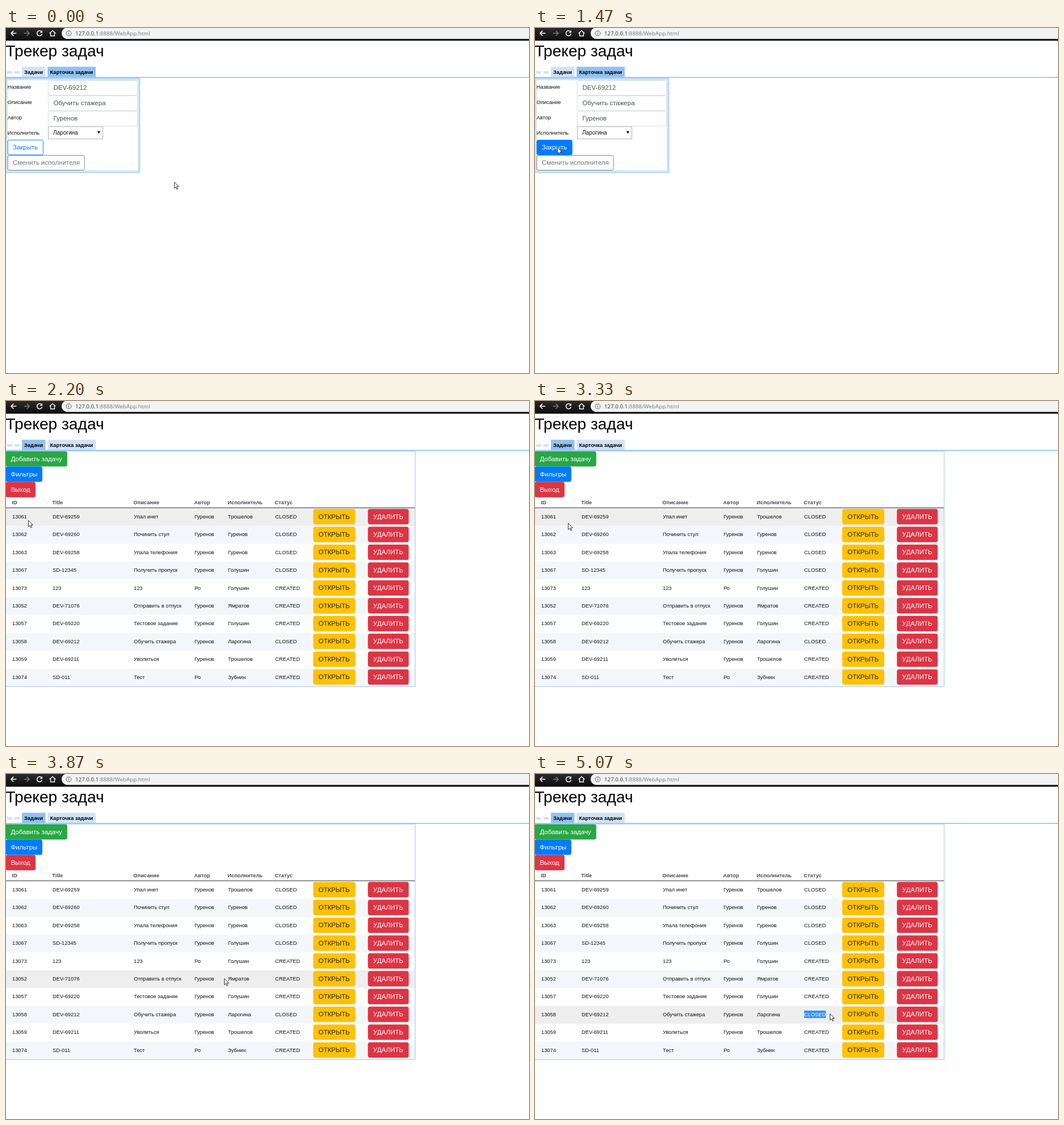
Animation of 921x608 px, one loop 5140 ms. Source, as an HTML page:

```html
<!DOCTYPE html>
<html lang="ru">
<head>
<meta charset="utf-8">
<title>Трекер задач</title>
<style>
  html, body { margin: 0; width: 100%; height: 100%; overflow: hidden; background: #fff; }
  svg { display: block; width: 921px; height: 608px; font-family: "Liberation Sans", Arial, sans-serif; }
  text { white-space: pre; }
</style>
</head>
<body>
<svg id="stage" viewBox="0 0 921 608" xmlns="http://www.w3.org/2000/svg"></svg>
<script>
const NS = 'http://www.w3.org/2000/svg';
const stage = document.getElementById('stage');
const SMALL = 9.3, NORMAL = 11.5;
const LIGHT = '#d0e4f6', ACCENT = '#92c1f0', BLUE = '#007bff', RED = '#dc3545';

function add(parent, tag, attrs = {}, content) {
  const el = document.createElementNS(NS, tag);
  for (const key in attrs) el.setAttribute(key, attrs[key]);
  if (content !== undefined) el.textContent = content;
  parent.appendChild(el);
  return el;
}
const rect = (g, x, y, width, height, fill, more) =>
  add(g, 'rect', { x, y, width, height, fill, ...more });
const label = (g, x, y, str, size = SMALL, fill = '#111', more) =>
  add(g, 'text', { x, y, 'font-size': size, fill, ...more }, str);
const path = (g, d, stroke, width = 1.5, more) =>
  add(g, 'path', { d, stroke, fill: 'none', 'stroke-width': width, ...more });
const show = (el, on) => el.setAttribute('visibility', on ? 'visible' : 'hidden');

function button(g, x, y, width, str, fill, color = '#fff', border = fill) {
  const box = rect(g, x + .4, y + .4, width - .8, 26.2, fill, { rx: 2.8, stroke: border, 'stroke-width': .9 });
  const caption = label(g, x + 9.2, y + 17.2, str, NORMAL, color);
  return { box, caption };
}

// Browser bar
const defs = add(stage, 'defs');
const shade = add(defs, 'linearGradient', { id: 'shade', x2: 0, y2: 1 });
add(shade, 'stop', { 'stop-color': '#2b2b2b' });
add(shade, 'stop', { offset: 1, 'stop-color': '#0c0c0c' });
rect(stage, 0, 0, 921, 22.4, 'url(#shade)');
add(stage, 'path', { d: 'M921 0H104C100 2 98 5 98 9.5S102 19.2 108 19.2H921Z', fill: '#f1f3f4' });
const arrow = 'M18.3 9.3H9M13.3 4.9L8.9 9.3L13.3 13.7';
path(stage, arrow, '#fff');
path(stage, arrow, '#777', 1.5, { transform: 'translate(50 0) scale(-1 1) translate(0 0)' });
path(stage, 'M62.6 6.4A4.5 4.5 0 1 0 63.5 10.4', '#fff');
add(stage, 'path', { d: 'M64 4V8.6H59.4Z', fill: '#fff' });
path(stage, 'M76.6 9.6L82 4.6L87.4 9.6M78.6 8.6V14H85.4V8.6', '#fff', 1.4);
add(stage, 'circle', { cx: 110.5, cy: 9.3, r: 4.4, fill: 'none', stroke: '#5f6368', 'stroke-width': 1 });
path(stage, 'M110.5 8.7V11.8M110.5 6.6V7.8', '#5f6368', 1.1);
const url = label(stage, 122, 13, '', 9.75, '#333', { 'font-family': '"Open Sans", "Noto Sans", sans-serif' });
add(url, 'tspan', {}, '127.0.0.1');
add(url, 'tspan', { fill: '#777b80' }, ':8888/WebApp.html');

// Heading and tabs
label(stage, -.5, 50, 'Трекер задач', 28.1, '#000');
rect(stage, 2, 76, 9, 4.6, LIGHT);
rect(stage, 15, 76, 9, 4.6, LIGHT);
const listTab = rect(stage, 28, 68.3, 41.5, 18, LIGHT);
const cardTab = rect(stage, 73.3, 68.3, 84.7, 18, LIGHT);
const bold = { 'font-weight': 'bold' };
label(stage, 32, 80.5, 'Задачи', SMALL, '#000', bold);
label(stage, 77.5, 80.5, 'Карточка задачи', SMALL, '#000', bold);
rect(stage, 0, 86.2, 921, 1.6, ACCENT);

// Task card
const card = add(stage, 'g');
rect(card, -1, 88.5, 236.8, 166.5, LIGHT, { stroke: ACCENT, 'stroke-width': .9 });
rect(card, 3, 92, 229, 159, '#fff');
[['Название', 'DEV-69212'], ['Описание', 'Обучить стажера'], ['Автор', 'Гуренов']].forEach(([name, value], i) => {
  const y = 92 + i * 27.1;
  label(card, 2.8, y + 15, name);
  rect(card, 74.4, y + .4, 157.4, 26.4, '#fff', { rx: 2.8, stroke: '#ced4da', 'stroke-width': .8 });
  label(card, 83.5, y + 17.2, value, NORMAL, '#495057');
});
label(card, 2.8, 188, 'Исполнитель');
rect(card, 74.5, 173.9, 96, 21.4, '#fff', { stroke: '#a0a0a0', 'stroke-width': .8 });
label(card, 83, 187.8, 'Ларогина', 10);
add(card, 'path', { d: 'M160.8 181.8H166.2L163.5 186.4Z', fill: '#111' });
button(card, 2.8, 224, 135.8, 'Сменить исполнителя', '#fff', '#6c757d', '#6c757d');
const ring = rect(card, 1.6, 195.8, 65.4, 29.4, 'none', { rx: 4, stroke: BLUE, 'stroke-opacity': .5, 'stroke-width': 2.4 });
const close = button(card, 2.8, 197, 63, 'Закрыть', '#fff', BLUE, BLUE);

// Task list
const TOP = 189, PITCH = 31.4;
const columns = [11, 82, 225, 332, 391, 474];
const [A, B, C, D, E, F, G] = ['Гуренов', 'Трошелов', 'Голушин', 'Ямратов', 'Ларогина', 'Зубнин', 'Ро'];
const tasks = [
  ['13061', 'DEV-69259', 'Упал инет', A, B, 'CLOSED'],
  ['13062', 'DEV-69260', 'Починить стул', A, A, 'CLOSED'],
  ['13063', 'DEV-69258', 'Упала телефония', A, A, 'CLOSED'],
  ['13067', 'SD-12345', 'Получить пропуск', A, C, 'CLOSED'],
  ['13073', '123', '123', G, C, 'CREATED'],
  ['13052', 'DEV-71076', 'Отправить в отпуск', A, D, 'CREATED'],
  ['13057', 'DEV-69220', 'Тестовое задание', A, C, 'CREATED'],
  ['13058', 'DEV-69212', 'Обучить стажера', A, E, 'CLOSED'],
  ['13059', 'DEV-69211', 'Уволиться', A, B, 'CREATED'],
  ['13074', 'SD-011', 'Тест', G, F, 'CREATED']
];
const list = add(stage, 'g');
button(list, -.8, 88.4, 108.6, 'Добавить задачу', '#28a745');
button(list, -.8, 115.5, 64.8, 'Фильтры', BLUE);
button(list, -.8, 142.6, 52.8, 'Выход', RED);
['ID', 'Title', 'Описание', 'Автор', 'Исполнитель', 'Статус'].forEach((name, i) =>
  label(list, columns[i] - .7, 182, name, SMALL, '#4b4a5a', bold));
const stripe = i => i % 2 ? '#f3f7fb' : '#fff';
let status;
const rows = tasks.map((task, i) => {
  const y = TOP + i * PITCH;
  const row = rect(list, 0, y, 720, PITCH, stripe(i));
  task.forEach((value, c) => {
    const cell = label(list, columns[c], y + 18, value);
    if (i === 7 && c === 5) status = cell;
  });
  button(list, 541, y + 1.3, 74, 'ОТКРЫТЬ', '#ffc107', '#212529');
  button(list, 637.4, y + 1.3, 71.8, 'УДАЛИТЬ', RED);
  return row;
});
rect(list, 0, 187.5, 720, 1.5, '#6f7277');
path(list, 'M0 88.2H720.5V503.3H0', ACCENT, .9);

// Text selection over one status cell
const clip = add(add(defs, 'clipPath', { id: 'selected' }), 'rect', { x: 474, y: 417, width: 0, height: 13.2 });
const selection = add(list, 'g', { 'clip-path': 'url(#selected)' });
rect(selection, 474, 417, 60, 13.2, '#3390ff');
label(selection, 474, status.getAttribute('y'), 'CLOSED', SMALL, '#fff');

const cursor = add(stage, 'path', {
  d: 'M.5 .5V11.6L3.1 9.2L4.9 13.3L6.6 12.6L4.9 8.6H8.4Z',
  fill: '#fff', stroke: '#222', 'stroke-width': .9, 'stroke-linejoin': 'round'
});

// Pointer path: [tick, x, y], 15 ticks per second
const LOOP = 5140, TICK = 200 / 3;
const route = [
  [7, 296, 271], [15, 94, 210], [17, 69, 210], [22, 39, 210], [49, 39, 210], [50, 58, 215],
  [55, 292, 289], [57, 365, 344], [63, 450, 411], [65, 460, 414], [73, 511, 421], [76, 519, 422]
];

// Monotone cubic interpolation of one coordinate
function along(tick, axis) {
  const last = route.length - 1;
  if (tick <= route[0][0]) return route[0][axis];
  if (tick >= route[last][0]) return route[last][axis];
  const i = route.findIndex(p => p[0] > tick) - 1;
  const slope = j => (route[j + 1][axis] - route[j][axis]) / (route[j + 1][0] - route[j][0]);
  const tangent = j => {
    if (j === 0 || j === last) return 0;
    const a = slope(j - 1), b = slope(j);
    return a * b <= 0 ? 0 : 2 * a * b / (a + b);
  };
  const span = route[i + 1][0] - route[i][0], u = (tick - route[i][0]) / span, v = 1 - u;
  return v * v * (1 + 2 * u) * route[i][axis] + u * u * (3 - 2 * u) * route[i + 1][axis]
    + span * u * v * (v * tangent(i) - u * tangent(i + 1));
}

const clamp = x => Math.max(0, Math.min(1, x));
const blend = (from, to, k) => `rgb(${from.map((c, i) => Math.round(c + (to[i] - c) * k))})`;

function draw(ms) {
  const tick = Math.floor((ms + 3.4) / TICK);
  const x = Math.round(along(tick, 1)), y = Math.round(along(tick, 2));
  cursor.setAttribute('transform', `translate(${x} ${y})`);

  const sliding = tick >= 31, listed = tick >= 33;
  listTab.setAttribute('fill', sliding ? ACCENT : LIGHT);
  cardTab.setAttribute('fill', sliding ? LIGHT : ACCENT);
  show(card, !listed);
  show(list, listed);
  card.setAttribute('transform', `translate(${sliding ? (tick === 31 ? 184 : 642) : 0} 0)`);

  const hover = clamp((tick * TICK - 1170) / 150);
  close.box.setAttribute('fill', blend([255, 255, 255], [0, 123, 255], hover));
  close.caption.setAttribute('fill', blend([0, 123, 255], [255, 255, 255], hover));
  ring.setAttribute('visibility', tick >= 29 ? 'inherit' : 'hidden');

  const hovered = Math.floor((y - TOP) / PITCH);
  rows.forEach((row, i) => row.setAttribute('fill', i === hovered ? '#eee' : stripe(i)));

  let width = 0;
  for (let n = 1; n <= 6 && tick > 65; n++) {
    const end = status.getSubStringLength(0, n);
    if (x - 474 >= end - 3) width = end;
  }
  clip.setAttribute('width', width);
}

const start = performance.now();
function frame() {
  draw((performance.now() - start) % LOOP);
  requestAnimationFrame(frame);
}
frame();
</script>
</body>
</html>
```
